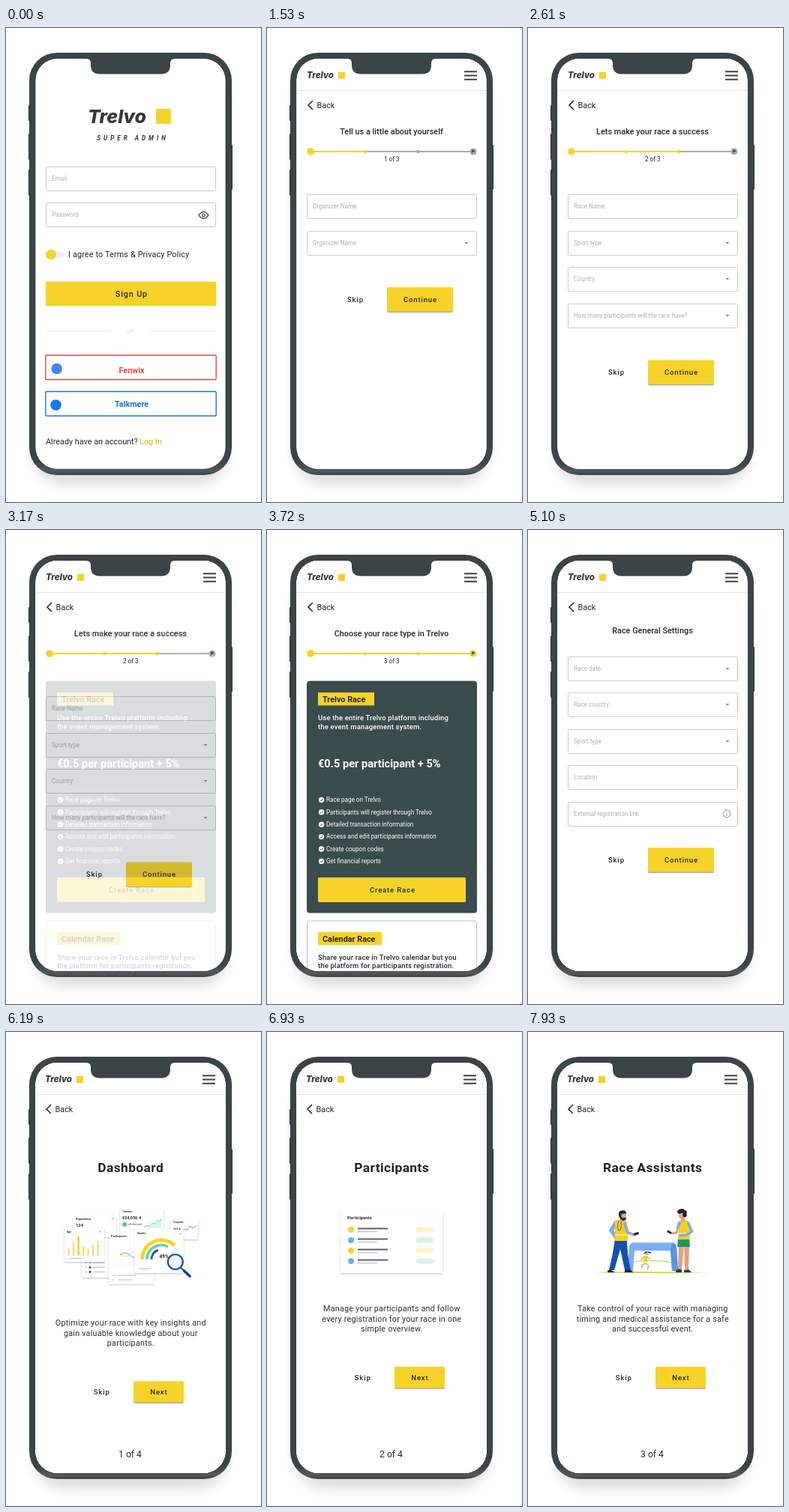
An HTML page for the animation above (8000 ms loop, 340 by 633 pixels).

```html
<!DOCTYPE html>
<html lang="en">
<head>
<meta charset="utf-8">
<title>Race sign-up flow</title>
<style>
html, body { margin: 0; width: 100%; height: 100%; overflow: hidden; background: #fff; }
svg { display: block; width: 100%; height: 100%; }
text { font-family: Roboto, "Noto Sans", sans-serif; white-space: pre; }
</style>
</head>
<body>
<svg id="stage" viewBox="0 0 340 633" preserveAspectRatio="none" xmlns="http://www.w3.org/2000/svg"></svg>
<script>
const LOOP = 8000;
const YELLOW = '#f7d228', DARK = '#3b4446', INK = '#24272b', HINT = '#adafb2', BODY = 10.84;

const rect = (x, y, w, h, fill, more = '') =>
  `<rect x="${x}" y="${y}" width="${w}" height="${h}" fill="${fill}" ${more}/>`;
const circle = (x, y, r, fill, more = '') =>
  `<circle cx="${x}" cy="${y}" r="${r}" fill="${fill}" ${more}/>`;
const line = (d, stroke, w = 1, more = '') =>
  `<path d="${d}" fill="none" stroke="${stroke}" stroke-width="${w}" ${more}/>`;
const shape = (d, fill, more = '') => `<path d="${d}" fill="${fill}" ${more}/>`;
const text = (x, y, str, { size = BODY, weight = 400, fill = INK, gap = 0, mid = false, more = '' } = {}) =>
  `<text x="${x + (mid ? gap / 2 : 0)}" y="${y}" font-size="${size}" font-weight="${weight}" fill="${fill}"` +
  ` letter-spacing="${gap}" ${mid ? 'text-anchor="middle"' : ''} ${more}>${str}</text>`;
const shift = (dx, dy, body) => `<g transform="translate(${dx} ${dy})">${body}</g>`;
const label = (x, y, str, mid = true, size = 9.5) => text(x, y, str, { size, weight: 500, gap: .85, mid });

const logo = (x, y, s) => `<g transform="translate(${x} ${y}) scale(${s})">` +
  text(0, 19.5, 'Trelvo', { size: 25, weight: 800, fill: '#333738', more: 'style="font-family:Inter,sans-serif" font-style="italic"' }) +
  rect(91, .5, 20, 20, YELLOW) + '</g>';

const header = () =>
  logo(53, 58.5, .46) +
  line('M263 58.3h17M263 63.5h17M263 68.7h17', '#3c4143', 2) +
  line('M39 83.5H293', '#e2e3e4') +
  line('M61 97l-6 6 6 6', '#2b2e30', 1.6) +
  text(66.5, 106.8, 'Back');

const title = (y, str) => text(166, y, str, { weight: 500, mid: true, gap: .03 });

const caret = (x, y) => shape(`M${x - 2.5} ${y - 1.2}h5l-2.5 2.7z`, '#85888b');
const field = (y, str, kind) =>
  rect(53.5, y + .5, 226, 32, '#fff', 'stroke="#c9cbcd" rx="1"') +
  text(61, y + 18.8, str, { size: 8.13, fill: HINT }) +
  (kind === 'list' ? caret(266, y + 16.3) : '');
const fields = (y, rows) => rows.map(([str, kind], i) => field(Math.round(y + i * 48.6), str, kind)).join('');

const button = (x, y, w, h, str) =>
  rect(x + .3, y + 1.3, w - .6, h, '#8a8a80', 'rx="1.5" opacity=".75"') +
  rect(x, y, w, h, YELLOW, 'rx="1.5"') +
  label(x + w / 2, y + h / 2 + 3.3, str);
const choices = y => label(117.5, y + 19.8, 'Skip') + button(160, y, 88, 32.5, 'Continue');

const STOPS = [58, 131, 201.5, 275];
function progress(step) {
  const grey = '#a4abb2', end = STOPS[step];
  const tone = i => i <= step ? YELLOW : grey;
  return line('M58 165H275', grey, 1.8) + line(`M58 165H${end}`, YELLOW, 2) +
    STOPS.map((x, i) => circle(x, 165, [4.8, 2.2, 2.2, 4.6][i], tone(i))).join('') +
    line('M273.4 167.6v-5', '#3b4446', .7) + shape('M273.4 162.8h3.6l-.8 1.4.8 1.4h-3.6z', '#3b4446') +
    text(166.3, 178, `${step} of 3`, { size: 8.13, mid: true });
}

const social = (y, base, str, color, dot, x) =>
  rect(52.8, y, 227.4, 32.5, '#fff', `stroke="${color}" stroke-width="1.4" rx="1.5"`) +
  circle(x, y + 18, 7.3, dot) +
  text(167.5, base, str, { weight: 600, fill: color, mid: true });

const signUp = () =>
  logo(109, 107.5, 1) +
  text(167, 150, 'SUPER ADMIN', { size: 8.1, weight: 600, gap: 4, mid: true, fill: '#333738', more: 'font-style="italic"' }) +
  field(185, 'Email') + field(233, 'Password') +
  line('M257 250q6.5-9 13 0q-6.5 9-13 0z', '#54585c', 1.3) +
  circle(263.5, 250, 1.9, 'none', 'stroke="#54585c" stroke-width="1.3"') +
  rect(57, 298.5, 20, 8.5, '#eef0f0', 'rx="4.2"') + circle(60, 302.7, 6.9, YELLOW) +
  text(83, 306, 'I agree to Terms &amp; Privacy Policy', { gap: .14 }) +
  rect(52.8, 338.7, 227.4, 32.5, YELLOW) + label(167, 358.8, 'Sign Up', true, BODY) +
  line('M53 404.5H140M193 404.5H280', '#e6e7e8') +
  text(166, 407, 'OR', { size: 8, fill: '#dcdee0', mid: true }) +
  social(437, 460.5, 'Fenwix', '#dd4b39', '#4285f4', 67.7) +
  social(485.5, 505.5, 'Talkmere', '#1c75d8', '#1877f2', 66.5) +
  text(53, 556.3, 'Already have an account?') +
  text(178, 556.3, 'Log In', { weight: 500, fill: '#e9c522' });

const about = () => header() + title(141.6, 'Tell us a little about yourself') + progress(1) +
  fields(222, [['Organizer Name'], ['Organizer Name', 'list']]) + choices(346.3);

const details = () => header() + title(141.6, 'Lets make your race a success') + progress(2) +
  fields(222, [['Race Name'], ['Sport type', 'list'], ['Country', 'list'],
    ['How many participants will the race have?', 'list']]) + choices(443.5);

const PERKS = ['Race page on Trelvo', 'Participants will register through Trelvo', 'Detailed transaction information',
  'Access and edit participants information', 'Create coupon codes', 'Get financial reports'];

function raceType() {
  const pitch = { size: 9.5, weight: 500, gap: .17 };
  const white = { ...pitch, fill: '#fff' };
  const badge = (y, w, str) => rect(68, y, w, 17.3, YELLOW) + text(74, y + 12.6, str, { weight: 600 });
  const perk = (str, i) => {
    const y = 360.4 + i * 16.4;
    return circle(72.6, y, 3.7, '#fff') + line(`M70.8 ${y}l1.4 1.5 2.4-2.8`, DARK, .9) +
      text(79, y + 2.8, str, { size: 8.13, fill: '#fff' });
  };
  return header() + title(141.6, 'Choose your race type in Trelvo') + progress(3) +
    rect(53, 201.5, 227, 310, '#3b4c4f', 'rx="4"') +
    badge(217, 75, 'Trelvo Race') +
    text(68, 254, 'Use the entire Trelvo platform including', white) +
    text(68, 265.6, 'the event management system.', white) +
    text(68, 317, '€0.5 per participant + 5%', { size: 14.6, weight: 700, fill: '#fff' }) +
    PERKS.map(perk).join('') +
    rect(68, 464, 197, 33, YELLOW, 'rx="1.5"') + label(167, 484, 'Create Race') +
    rect(53.5, 522, 226, 120, '#fff', 'rx="4" stroke="#b9bec0"') +
    badge(537, 85, 'Calendar Race') +
    text(68, 573.6, 'Share your race in Trelvo calendar but you', pitch) +
    text(68, 585.4, 'the platform for participants registration.', pitch);
}

const settings = () => header() + title(137.6, 'Race General Settings') +
  fields(168.5, [['Race date', 'list'], ['Race country', 'list'], ['Sport type', 'list'], ['Location'], ['External registration link']]) +
  circle(265, 379, 4.9, 'none', 'stroke="#808488" stroke-width=".9"') +
  line('M265 378v3.6M265 375.9v1.1', '#808488', 1) + choices(424.2);

// Onboarding pages share one layout; only the copy and the picture differ.
const tour = (n, name, art, y, lines) =>
  shift(-1, 0, header()) +
  text(166, 187.3, name, { size: 17.4, weight: 700, gap: .4, mid: true, fill: '#1d242c' }) + art +
  lines.map((s, i) => text(166.2, y + i * 13.5, s, { gap: .2, mid: true, fill: '#2c3034' })).join('') +
  label(127.3, y + 92, 'Skip') + button(170, y + 74, 67, 28.5, 'Next') +
  text(165.5, 568, `${n} of 4`, { size: 12.19, mid: true });

const panel = (x, y, w, h) => rect(x, y, w, h, '#fff', 'rx="1" filter="url(#soft)"');
const tiny = (x, y, str, size = 3.4, weight = 700) => text(x, y, str, { size, weight });
const arc = (cx, cy, r, from, to, color, w) => {
  const at = a => `${cx + r * Math.cos(a * Math.PI)} ${cy + r * Math.sin(a * Math.PI)}`;
  return line(`M${at(from)}A${r} ${r} 0 0 1 ${at(to)}`, color, w);
};

function charts() {
  const bars = [9, 17, 25, 12, 9, 14, 19].map((h, i) => rect(82.5 + i * 6.5, 298 - h, 2.3, h, i === 2 ? '#f2c61d' : '#f6dc70'));
  const rows = [0, 1, 2].map(i => circle(112, 308 + i * 6.2, 1.4, ['#d9a48a', '#34495e', '#30343a'][i]) +
    line(`M116 ${308 + i * 6.2}h16M105 ${308 + i * 6.2}h3`, '#a6abb0', .9));
  const spark = 'M184 260l4-2 4 1 3-4 4 1 3-5 3 2 2-4';
  return panel(90, 246, 57, 28) + tiny(93, 251.3, 'Registrations') + tiny(93, 260.3, '124', 5.8) + line('M141 251l3-3', '#555', .6) +
    panel(220, 250, 36, 27) + tiny(223, 255.3, 'Coupons') + tiny(223, 265.5, '224', 5.8) +
    line('M234 267l4-4 3 2 4-6 4 3 5-3', '#3f9ad6', .9) +
    panel(152, 236, 58, 30) + tiny(155, 241, 'Turnover') + tiny(155, 249.5, '€24,036.4', 5.5) +
    circle(158.3, 257, 3, '#3fcf9a') + tiny(163, 258.2, '+8% this month', 2.7, 400) +
    shape(spark + 'V262H184z', '#d8f3e8') + line(spark, '#59c79c', .7) +
    panel(101, 295, 44, 33) + rows.join('') +
    panel(137, 266, 60, 70.5) + tiny(140, 274, 'Participants', 3.8) +
    line('M152 298q7-6 13 0t13 1', '#3f7fd0', .8) + line('M152 296q6 7 13 1t12-3', YELLOW, .8) +
    line('M141 310h42', '#e6e8ea', .5) + line('M142 325h3M149 325h25M142 331h3M149 331h19', '#9da2a7', .8) +
    panel(78, 262, 53, 45) + tiny(81, 268, 'Age') + line('M124 268l3-3', '#555', .6) + bars.join('') +
    line('M82 298.5h45', '#dfe2e4', .5) + line('M85 302.5h17', '#a6abb0', .8) +
    panel(171.5, 264, 65, 58) + tiny(175, 270, 'Gender') + line('M231 271l3-3', '#555', .6) +
    arc(207, 303.5, 25.5, 1, 1.74, YELLOW, 4.8) + arc(207, 303.5, 19, 1, 1.66, '#67cfa2', 3.6) +
    arc(207, 303.5, 13, 1, 1.4, '#1d4fa5', 2.8) +
    line('M177 316h16', '#9da2a7', .8) + tiny(204.5, 301.5, '49%', 6.5) +
    circle(225.8, 307, 10, '#d8ebfb', 'fill-opacity=".5" stroke="#1a4cab" stroke-width="2.2"') +
    line('M233 315l5 4', '#1a4cab', 2) + line('M237.5 319l7.5 7', '#173f93', 3.6, 'stroke-linecap="round"');
}

function roster() {
  const row = (_, i) => circle(112, 264 + i * 14, 4, i % 2 ? '#77acf2' : YELLOW) +
    line(`M121 ${262.5 + i * 14}h40`, '#5c6268', 1.8) + line(`M121 ${266.5 + i * 14}h26`, '#c3c8cc', 1.5) +
    rect(199, 260.5 + i * 14, 23, 7, i % 2 ? '#d8f3e8' : '#fdf3c4', 'rx="3.5"');
  return panel(98, 238, 136, 84) + tiny(107, 250, 'Participants', 6) + Array.from({ length: 4 }, row).join('');
}

function crew() {
  const skin = '#e2a17f', hair = '#1d2430', vest = '#f8cf1d', blue = '#79aef3', navy = '#1450b4';
  const round = 'stroke-linecap="round" stroke-linejoin="round"';
  const man =
    shape('M116 277h16q0 20 5 41h-8l-6-28-8 28h-7q5-20 8-41z', navy) +
    shape('M106 321v-2.5l4-1 6 3.5zM129 321v-3.5h7l5 3.5z', '#17233a') +
    line('M117 255l-6 10 6 9', blue, 5.5, round) +
    shape('M116 252q8-4 15 0l3 14-1 13h-18l1-14z', vest) + line('M116 271h17', '#fff3b0', 1.6) +
    line('M121 252q-3 9 0 13q4 1 3-12', '#2b5fae', .9) +
    line('M129 256l4 12 8 2.5', blue, 3.8, round) + line('M136 269.5l6 1', skin, 2.6, round) +
    rect(141, 268, 7, 3, hair, 'transform="rotate(-18 144 270)" rx=".8"') +
    rect(123, 247, 5, 6, skin) + circle(126, 244.8, 4.7, skin) +
    shape('M121 245q-1-6 4-6.5q6-1 6 4l-6 0-1 4 2 2 5-1q0 4-4 4.5q-4-1-6-7z', hair);
  const woman =
    shape('M201 283h7l-3 34h-5zM208 283h7l-1 34h-5z', skin) +
    shape('M197 321v-2.5l4-2 4 1v3.5zM208 321v-3l6-1 4 4z', '#27364f') +
    shape('M200 275h15l1 12h-17z', '#1d9a62') +
    shape('M201 253q7-4 14 0l2 11-1 13h-16l1-13z', vest) + line('M201 269h15', '#fff3b0', 1.5) +
    line('M201 257l-3 11-6 1', skin, 3, round) + line('M202 255l-2 6', blue, 4, round) +
    line('M214 256l4.5 10-7 5-9 1', blue, 3.6, round) +
    rect(185.5, 265.5, 6, 3, hair, 'transform="rotate(28 188 267)" rx=".8"') +
    rect(204, 247, 5, 6, skin) + circle(205.5, 245, 4.6, skin) +
    [[202, 240], [206, 238.7], [209, 241], [209, 244.5], [204, 239]].map(([x, y]) => circle(x, y, 2.8, hair)).join('');
  const gate =
    shape('M133 319l2-32q1-6 7-6h48q7 0 8 6l2 32h-8l-2-27h-48l-2 27z', blue) +
    shape('M190 292l2 27h8l-2-32q-1-5-6-6z', '#5b94e6') +
    line('M138 281.8h56', '#9cc4f9', 1.2) +
    line('M142 306.5q22-3 50 1', '#b9d84c', 1.1);
  const runner =
    line('M157 309l-5 2 0 4M157 309l4 3-2 5', skin, 1.5, round) +
    shape('M154.5 299h5l-.5 8h-5z', vest) + line('M156 300l-5 4M159 301l4 2', skin, 1.2, round) +
    circle(158, 296, 2.1, skin) + shape('M155 295q2-3 5-1.5l-4 2-2 2z', hair) + line('M160 294l4 1', hair, 1.6);
  const ground = shape('M91 321.5q35-2 76-1.2t76 .7q-40 1.5-76 1t-76-.5z', '#bfd63f');
  return gate + runner + ground + man + woman;
}

const dashboard = () => tour(1, 'Dashboard', charts(), 392.2,
  ['Optimize your race with key insights and', 'gain valuable knowledge about your', 'participants.']);
const people = () => tour(2, 'Participants', roster(), 373,
  ['Manage your participants and follow', 'every registration for your race in one', 'simple overview.']);
const assistants = () => tour(3, 'Race Assistants', crew(), 373,
  ['Take control of your race with managing', 'timing and medical assistance for a safe', 'and successful event.']);

// Each screen dissolves over the previous one: [time, opacity] steps.
const SCREENS = [
  [signUp, [[0, 1]]],
  [about, [[830, .4], [920, 1]]],
  [details, [[1900, .4], [1980, 1]]],
  [raceType, [[3170, .19], [3250, 1]]],
  [settings, [[4380, .74], [4470, 1]]],
  [dashboard, [[5380, .2], [5470, .75], [5560, 1]]],
  [people, [[6570, .2], [6660, .75], [6750, 1]]],
  [assistants, [[7560, .5], [7650, 1]]]
];

const stage = document.getElementById('stage');
const keys = [[103, 21], [141, 35], [189, 35]];
stage.innerHTML = `<defs>
  <clipPath id="glass"><rect x="39.4" y="41" width="253.2" height="547.8" rx="29"/></clipPath>
  <filter id="soft" x="-20%" y="-20%" width="140%" height="150%"><feDropShadow dx="0" dy="1" stdDeviation="1.3" flood-color="#000" flood-opacity=".25"/></filter>
  <filter id="blur" x="-20%" y="-20%" width="140%" height="140%"><feGaussianBlur stdDeviation="9"/></filter>
  <linearGradient id="rim" x1="0" y1="0" x2="0" y2="1">
    <stop offset=".97" stop-color="${DARK}"/><stop offset=".99" stop-color="#505a5c"/><stop offset="1" stop-color="#3b4446"/>
  </linearGradient></defs>` +
  rect(38, 60, 256, 549, '#000', 'rx="38" opacity=".14" filter="url(#blur)"') +
  keys.map(([y, h]) => rect(30, y, 3, h, '#2e3638', 'rx="1"')).join('') +
  rect(299, 156, 3, 60, '#2e3638', 'rx="1"') +
  rect(31, 33, 270, 564, 'url(#rim)', 'rx="37"') +
  '<g clip-path="url(#glass)">' +
  SCREENS.map(([draw]) => `<g class="screen" opacity="0">${rect(39, 41, 254, 548, '#fff')}${draw()}</g>`).join('') + '</g>' +
  shape('M107 40h118v1q-6 0-6 6v2.5q0 12-12 12h-82q-12 0-12-12v-2.5q0-6-6-6z', DARK);

const screens = [...stage.querySelectorAll('.screen')];
function draw(now) {
  const t = now % LOOP;
  SCREENS.forEach(([, steps], i) => {
    const past = steps.filter(([at]) => at <= t);
    screens[i].setAttribute('opacity', past.length ? past[past.length - 1][1] : 0);
  });
}
const start = performance.now();
function tick() {
  draw(performance.now() - start);
  requestAnimationFrame(tick);
}
tick();
</script>
</body>
</html>
```
